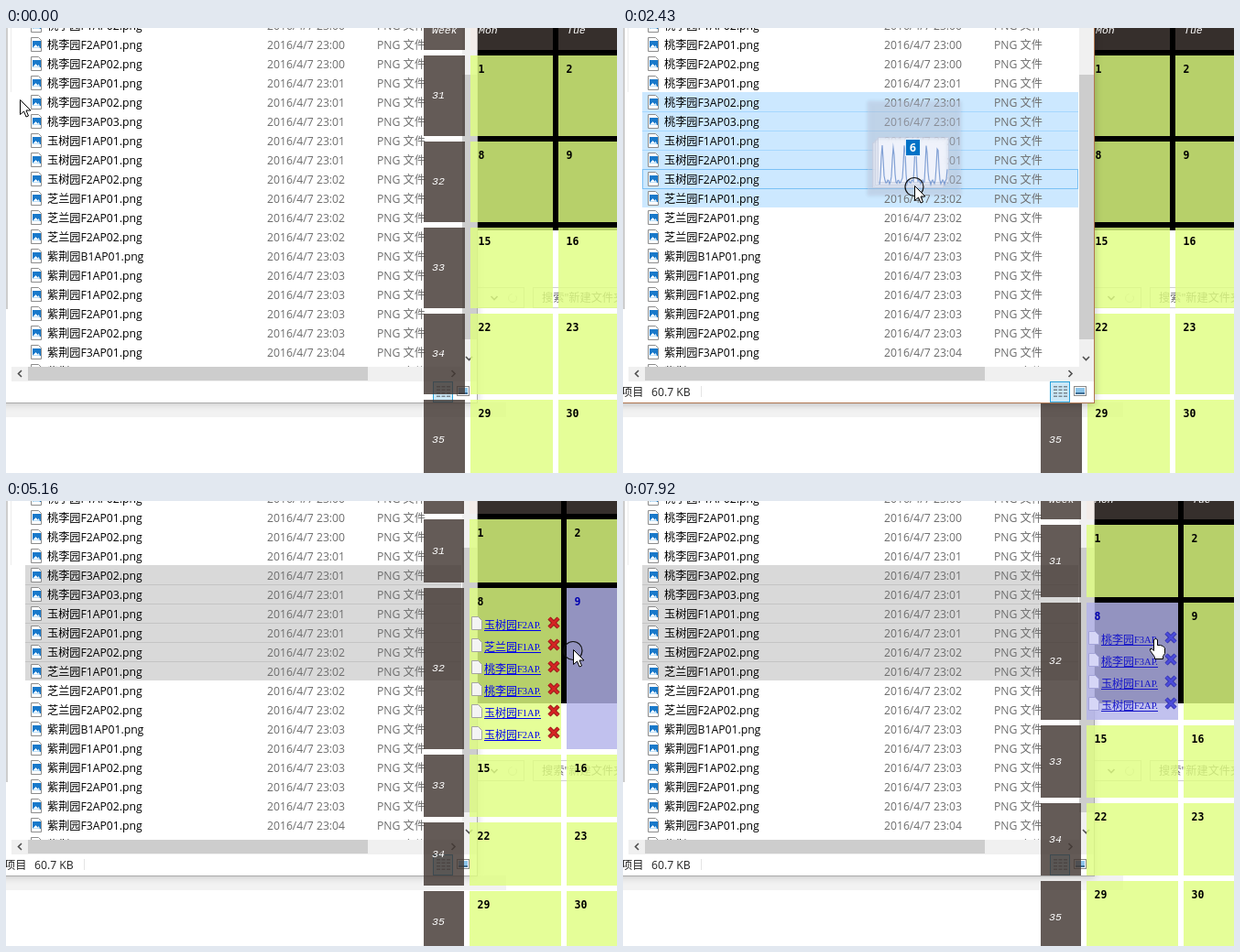
Write an HTML page with a canvas that moves like this. It is 667 px wide and 486 px high and loops after 8000 ms.

```html
<!DOCTYPE html>
<html lang="zh">
<head>
<meta charset="utf-8">
<style>
html, body { margin: 0; width: 100%; height: 100%; overflow: hidden; background: #fff; }
canvas { display: block; }
</style>
</head>
<body>
<canvas id="stage" width="667" height="486"></canvas>
<script>
const ctx = document.getElementById('stage').getContext('2d');
const LOOP = 8000;
const STEP = 134;
const UI = '12.2px "Open Sans", "Noto Sans CJK SC", "Noto Sans CJK", sans-serif';
const CJK = '12px "Noto Sans CJK SC", "Noto Sans CJK", sans-serif';
const ORIGIN = { x: 15, y: 78 };

// Each move: start time, number of refreshes, destination
const MOVES = [
  [150, 5, 80, 155], [820, 3, 112, 186],   // rubber-band selection
  [1230, 4, 85, 165], [2010, 8, 551, 178], // grab the files and drag them over
  [4450, 1, 562, 177], [4610, 3, 619, 162],
  [5990, 2, 598, 134], [7550, 3, 581, 150],
];
const PRESSES = [[150, 1230], [1760, 3340], [5160, 5280], [6420, 6560], [7400, 7550]];

const HALLS = { 桃李园: 'F1AP02 F2AP01 F2AP02 F3AP01 F3AP02 F3AP03', 玉树园: 'F1AP01 F2AP01 F2AP02',
  芝兰园: 'F1AP01 F2AP01 F2AP02', 紫荆园: 'B1AP01 F1AP01 F1AP02 F2AP01 F2AP02 F3AP01 F3AP02' };
const FILES = Object.entries(HALLS).flatMap(([hall, list]) => list.split(' ').map(s => hall + s + '.png'));
const UPLOADS = ['玉树园F2AP.', '芝兰园F1AP.', '桃李园F3AP.', '桃李园F3AP.', '玉树园F1AP.', '玉树园F2AP.'];

const within = (t, [a, b]) => t >= a && t < b;

function rect(x, y, w, h, fill, stroke) {
  if (fill) { ctx.fillStyle = fill; ctx.fillRect(x, y, w, h); }
  if (stroke) { ctx.strokeStyle = stroke; ctx.lineWidth = 1; ctx.strokeRect(x + .5, y + .5, w - 1, h - 1); }
}

function text(s, x, y, color, font = UI) {
  ctx.font = font;
  ctx.fillStyle = color;
  ctx.fillText(s, x, y);
}

function line(points, color, width = 1) {
  ctx.beginPath();
  points.forEach(([x, y]) => ctx.lineTo(x, y));
  ctx.strokeStyle = color;
  ctx.lineWidth = width;
  ctx.stroke();
}

function shape(points, x, y, fill, stroke) {
  ctx.beginPath();
  points.forEach(([dx, dy]) => ctx.lineTo(x + dx + .5, y + dy + .5));
  ctx.closePath();
  ctx.fillStyle = fill;
  ctx.fill();
  ctx.strokeStyle = stroke;
  ctx.lineWidth = 1;
  ctx.stroke();
}

function chevron(x, y, quarterTurns, color = '#505050') {
  ctx.save();
  ctx.translate(x, y);
  ctx.rotate(quarterTurns * Math.PI / 2);
  line([[-3.5, -2], [0, 1.5], [3.5, -2]], color, 1.6);
  ctx.restore();
}

function clipped(x, y, w, h, draw) {
  ctx.save();
  ctx.beginPath();
  ctx.rect(x, y, w, h);
  ctx.clip();
  draw();
  ctx.restore();
}

function pointerAt(t) {
  let { x, y } = ORIGIN;
  for (const [start, steps, toX, toY] of MOVES) {
    if (t < start) break;
    const k = Math.min(1, (Math.floor((t - start) / STEP) + 1) / steps);
    x += (toX - x) * k;
    y += (toY - y) * k;
  }
  return { x: Math.round(x), y: Math.round(y) };
}

function drawBackdrop() {
  rect(0, 0, 667, 486, '#fff');
  rect(0, 409, 546, 16, '#f2f2f2');
  rect(507, 0, 160, 221, '#000');
  rect(500, 283, 66, 23, '#fff', '#d0d0d0');
  rect(575, 283, 100, 23, '#fff', '#d0d0d0');
  chevron(533, 295, 0, '#555');
  ctx.beginPath();
  ctx.arc(553, 295, 4.5, -.6, 4.6);
  ctx.stroke();
  text('搜索"新建文件夹"', 585, 299, '#666');
}

function drawUpload(name, x, y, hovered) {
  shape([[2, -9], [9, -9], [13, -5], [13, 5], [2, 5]], x, y, hovered ? '#d6d6f6' : '#f4f4f4',
    hovered ? '#a4a4d8' : '#a5a5a0');
  const color = hovered ? '#1616c8' : '#0000ee';
  clipped(x + 16, y - 10, 62, 20, () => {
    text(name.slice(0, 3), x + 16, y + 5, color, CJK);
    text(name.slice(3), x + 52, y + 4, color, '10.5px "Liberation Serif", serif');
    rect(x + 16, y + 6, 62, 1, color);
  });
  const strokes = hovered ? [['#3030a8', 4.5], ['#4c4cda', 2.6]] : [['#8c1616', 4.5], ['#d42424', 2.6]];
  for (const [color, width] of strokes) {
    line([[x + 87, y - 7], [x + 97, y + 3]], color, width);
    line([[x + 97, y - 7], [x + 87, y + 3]], color, width);
  }
}

// Uploads make their own week taller and squeeze the others.
function calendarLayout(count) {
  if (!count) return { top: 30, row: 88, tall: 88, left: 507, col: 90 };
  return { top: 38 - 3 * count, row: 99.8 - 5.2 * count, tall: 32 + 24 * count, left: 506, col: 100 };
}

function drawCalendar(count, hoveredDay) {
  const { top, row, tall, left, col } = calendarLayout(count);
  const brown = 'rgba(66,56,51,.82)', weekFont = 'italic 11.5px "Liberation Mono", monospace';
  const columns = [left, left + col + 6];
  const weekWidth = left - 462;
  rect(456, 0, weekWidth, top - 6, brown);
  text('Week', 465, top - 24, '#fff', weekFont);
  columns.forEach((x, c) => {
    rect(x, 0, col, top - 6, 'rgba(255,219,205,.21)');
    text(['Mon', 'Tue'][c], x + 9, top - 24, '#fff', weekFont);
  });
  let next = top;
  for (let week = 0; week < 5; week++) {
    const y = Math.round(next);
    next += week === 1 ? tall : row;
    const h = Math.round(next) - y;
    next += 6;
    rect(456, y, weekWidth, h, brown);
    text(31 + week, 465, y + h / 2 + 3, '#fff', weekFont);
    columns.forEach((x, c) => {
      const day = 1 + 7 * week + c, hovered = day === hoveredDay;
      rect(x, y, col, h, hovered ? 'rgba(180,180,235,.82)' : 'rgba(224,254,130,.82)');
      text(day, x + 8.5, y + 19, hovered ? '#0000b0' : '#000', 'bold 11.5px "DejaVu Sans Mono", monospace');
      if (day !== 8) return;
      UPLOADS.slice(UPLOADS.length - count).forEach((name, i) => drawUpload(name, x, y + 40 + 24 * i, hovered));
    });
  }
}

function drawFileRow(name, i) {
  const y = -3 + 21 * i;
  shape([[0, -8], [8, -8], [11, -5], [11, 7], [0, 7]], 27, y, '#fff', '#8c8c8c');
  rect(29, y - 4, 9, 8, '#1979ca');
  shape([[0, 3], [3, 0], [5, 2], [6, 1], [7, 3]], 29, y, '#fff', '#bfe0f8');
  text(name, 45, y + 5, '#000');
  text('2016/4/7 23:0' + Math.floor((i + 2) / 4.6), 285, y + 5, '#6d6d6d');
  text('PNG 文件', 405, y + 5, '#6d6d6d');
}

function drawSelection(active, count, focused) {
  const top = 70, h = 21;
  rect(21, top, 476, h * count, active ? '#cce8ff' : '#d9d9d9');
  for (let i = 1; i < count; i++) rect(21, top + h * i, 476, 1, active ? '#a6d8ff' : '#c4c4c4');
  if (focused && active) rect(21, top + 4 * h, 476, h + 1, null, '#7cc1f5');
}

function drawExplorer(active, selected, focused) {
  ctx.save();
  ctx.shadowColor = active ? 'rgba(0,0,0,.25)' : 'rgba(0,0,0,.18)';
  ctx.shadowBlur = 8;
  ctx.shadowOffsetY = 1;
  rect(-20, -20, 535, 430, active ? '#b0764f' : '#aaa');
  ctx.restore();
  rect(0, 0, 514, 409, '#fff');
  rect(0, 0, 2, 307, '#cdcdcd');
  rect(5, 0, 1, 70, '#ececec');

  if (selected) drawSelection(active, selected, focused);
  clipped(0, 0, 498, 370, () => FILES.forEach(drawFileRow));

  rect(498, 0, 16, 370, '#f0f0f0');
  rect(498, 51, 16, 289, '#cdcdcd');
  rect(6, 370, 508, 16, '#f0f0f0');
  rect(24, 370, 371, 15, '#cdcdcd');
  chevron(505.5, 361, 0);
  chevron(15, 377.5, 1);
  chevron(488.5, 377.5, -1);

  if (selected) {
    text('项目', -2, 402, '#222');
    text(selected < 6 ? '18.6 KB' : '60.7 KB', 31, 402, '#222');
    rect(85, 391, 1, 12, '#e4e4e4');
  }
  rect(466, 386, 22, 23, '#cbe8f7', '#26a0da');
  for (let i = 0; i < 12; i++) rect(470 + 5.5 * (i % 3), 391 + 3.5 * Math.floor(i / 3), 4, 1.5, '#7a8790');
  rect(492, 391, 14, 11, '#fff', '#888');
  rect(494, 393, 10, 7, '#8cc4ea');
  rect(494, 398, 10, 2, '#3f6f96');
}

function drawDragImage(x, y, canCopy) {
  const left = x - 51, top = y - 92;
  ctx.save();
  ctx.shadowColor = 'rgba(0,0,0,.3)';
  ctx.shadowBlur = 4;
  rect(left, top, 102, 103, 'rgba(205,215,240,.36)');
  ctx.restore();
  for (let i = 0; i < 5; i++) {
    rect(left + 5 + 1.5 * i, top + 45 - 1.5 * i, 78, 50, 'rgba(240,243,252,.6)', 'rgba(150,160,190,.35)');
  }
  const spikes = Array.from({ length: 75 }, (_, i) => {
    const peak = Math.max(0, Math.sin(i * .52)) ** 3;
    return [left + 13 + i, top + 91 - 40 * peak - 5 * Math.abs(Math.sin(i * 2.3))];
  });
  line(spikes, 'rgba(95,135,200,.75)', 1.2);
  rect(left + 41, top + 41, 17, 19, '#0072c6', '#dfefff');
  text('6', left + 46, top + 55, '#fff', 'bold 12px "Open Sans", sans-serif');
  if (canCopy) {
    rect(x + 11, y + 14, 50, 19, '#fff', '#767676');
    rect(x + 15, y + 22, 10, 2, '#0033b0');
    rect(x + 19, y + 18, 2, 10, '#0033b0');
    text('复制', x + 30, y + 28, '#003399');
  }
}

function drawPointer(x, y, hand, pressed) {
  if (pressed) {
    ctx.beginPath();
    ctx.arc(x, y + 1.5, 10, 0, 7);
    ctx.strokeStyle = '#111';
    ctx.lineWidth = 1.2;
    ctx.stroke();
  }
  if (hand) {
    shape([[-2, 1], [0, 0], [2, 1], [2, 7], [5, 7], [8, 8], [10, 10], [10, 16], [8, 19], [8, 22], [-1, 22],
      [-1, 20], [-6, 13], [-6, 11], [-4, 11], [-2, 13]], x, y, '#fff', '#000');
  } else {
    shape([[0, 0], [0, 16], [4, 12.5], [6.5, 18.5], [9, 17.5], [6.5, 11.5], [11.5, 11.5]], x, y, '#fff', '#000');
  }
}

function render(t) {
  const { x, y } = pointerAt(t);
  const uploads = t < 3620 ? 0 : t < 6700 ? 6 : t < 7550 ? 5 : 4;
  const explorerActive = within(t, [150, 5160]);
  const overDrop = within(t, [2010, 3620]) && x > 514;
  const hovering = t >= 4450;
  const hoveredDay = overDrop || (hovering && x < 606) ? 8 : hovering && x >= 612 ? 9 : 0;
  const selected = t < 1230 ? Math.ceil((y - 71) / 21) : 6;

  drawBackdrop();
  const calendar = () => drawCalendar(uploads, hoveredDay);
  const explorer = () => drawExplorer(explorerActive, t < 150 ? 0 : selected, t >= 1760);
  for (const draw of explorerActive ? [calendar, explorer] : [explorer, calendar]) draw();

  if (within(t, [150, 1230])) {
    rect(ORIGIN.x, ORIGIN.y, x - ORIGIN.x, y - ORIGIN.y, 'rgba(0,120,215,.42)', '#3a96e8');
  }
  if (within(t, [2010, 3340])) drawDragImage(x, y, overDrop);
  drawPointer(x, y, hovering && hoveredDay === 8, PRESSES.some(span => within(t, span)));
}

const start = performance.now();
function frame() {
  render((performance.now() - start) % LOOP);
  requestAnimationFrame(frame);
}
frame();
</script>
</body>
</html>
```
